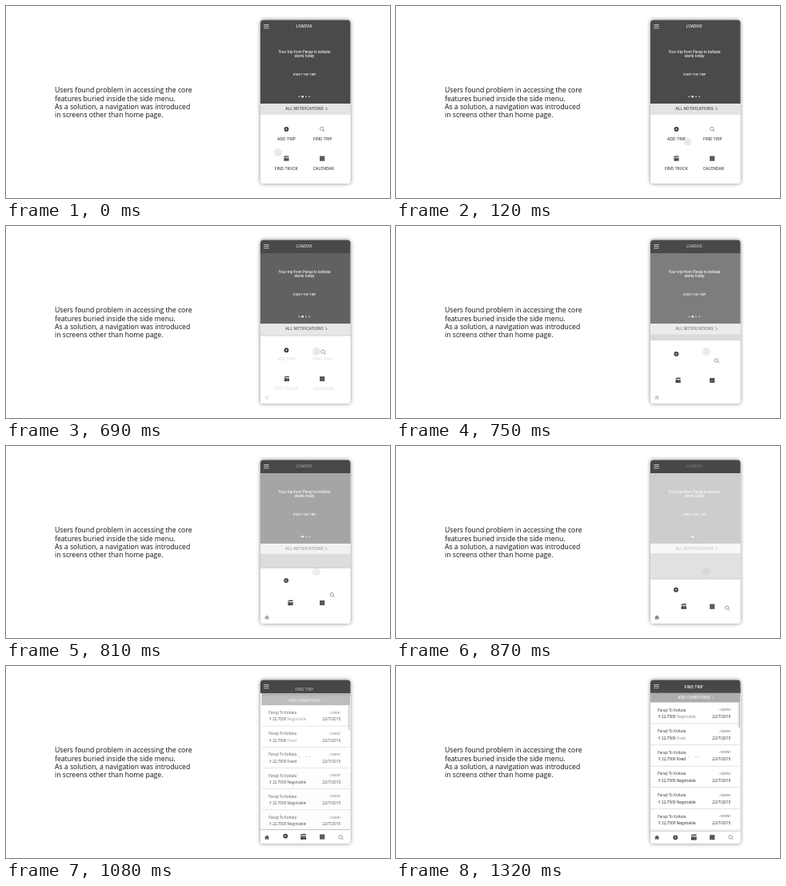
Write an HTML page with a canvas that moves like this. It is 480 by 240 pixels and loops after 2220 ms.

```html
<!DOCTYPE html>
<html lang="en">
<head>
<meta charset="utf-8">
<title>Trip finder navigation</title>
<style>
  html, body { margin: 0; width: 100%; height: 100%; overflow: hidden; background: #fff; }
  canvas { display: block; width: 480px; height: 240px; }
</style>
</head>
<body>
<canvas id="stage"></canvas>
<script>
const LOOP = 2220;
const canvas = document.getElementById('stage');
const ctx = canvas.getContext('2d');
const ratio = window.devicePixelRatio || 1;
canvas.width = 480 * ratio;
canvas.height = 240 * ratio;

const UI = 'Inter, sans-serif';
const BODY = '"Open Sans", sans-serif';
const DARK = '#4a4a4a';
const INK = '#3c3c3c';

const lerp = (a, b, p) => a + (b - a) * p;
const gray = v => `rgb(${v},${v},${v})`;

// Quadratic ease-in-out between two times.
function ease(t, start, end) {
  const p = Math.min(1, Math.max(0, (t - start) / (end - start)));
  return p < 0.5 ? 2 * p * p : 1 - 2 * (1 - p) ** 2;
}

function rect(x, y, w, h, color) {
  ctx.fillStyle = color;
  ctx.fillRect(x, y, w, h);
}

function disc(x, y, r, color) {
  ctx.fillStyle = color;
  ctx.beginPath();
  ctx.arc(x, y, r, 0, Math.PI * 2);
  ctx.fill();
}

function path(points, color, width = 0.8) {
  ctx.strokeStyle = color;
  ctx.lineWidth = width;
  ctx.beginPath();
  points.forEach(([x, y]) => ctx.lineTo(x, y));
  ctx.stroke();
}

// Text centred vertically on its capitals.
function text(str, x, y, size, color, { font = UI, weight = 500, align = 'center' } = {}) {
  ctx.font = `${weight} ${size}px ${font}`;
  ctx.textAlign = align;
  ctx.fillStyle = color;
  ctx.fillText(str, x, y + size * 0.36);
}

function withAlpha(alpha, draw) {
  if (alpha <= 0) return;
  ctx.save();
  ctx.globalAlpha *= alpha;
  draw();
  ctx.restore();
}

function at(x, y, scale, draw) {
  ctx.save();
  ctx.translate(x, y);
  ctx.scale(scale, scale);
  draw();
  ctx.restore();
}

function plusIcon() {
  disc(0, 0, 2.9, INK);
  path([[-1.3, 0], [1.3, 0]], '#ddd', 0.7);
  path([[0, -1.3], [0, 1.3]], '#ddd', 0.7);
}

function searchIcon() {
  ctx.strokeStyle = '#777';
  ctx.lineWidth = 0.7;
  ctx.beginPath();
  ctx.arc(-0.5, -0.5, 2.2, 0, Math.PI * 2);
  ctx.stroke();
  path([[1.1, 1.1], [2.9, 2.9]], '#777');
}

function truckIcon() {
  rect(-3, -1, 6, 4, INK);
  path([[-3, -2], [0, -2.8], [3, -2.6]], INK, 1.2);
  path([[-3, -0.2], [3, -0.2]], '#bbb', 0.5);
  path([[0.7, 0.2], [0.7, 3]], '#bbb', 0.5);
}

function gridIcon() {
  rect(-2.9, -2.9, 5.8, 5.8, '#8a8a8a');
  for (let i = 0; i < 9; i++) rect(-2.9 + (i % 3) * 2.1, -2.9 + Math.floor(i / 3) * 2.1, 1.6, 1.6, '#333');
}

function homeIcon() {
  path([[-2.8, 0.2], [0, -2.3], [2.8, 0.2]], '#333', 0.9);
  ctx.fillStyle = '#333';
  ctx.beginPath();
  [[-1.9, 0.2], [0, -1.5], [1.9, 0.2], [1.9, 2.6], [0.6, 2.6], [0.6, 0.9], [-0.6, 0.9], [-0.6, 2.6], [-1.9, 2.6]]
    .forEach(([x, y]) => ctx.lineTo(x, y));
  ctx.fill();
}

function phonePath() {
  ctx.beginPath();
  ctx.roundRect(318, 17.5, 112.5, 204.5, 4);
}

function caption() {
  [
    'Users found problem in accessing the core',
    'features buried inside the side menu.',
    'As a solution, a navigation was introduced',
    'in screens other than home page.'
  ].forEach((line, i) => text(line, 61, 105.3 + i * 10.35, 8.66, '#111', { font: BODY, weight: 400, align: 'left' }));
}

function homeScreen(fade, move) {
  rect(318, 34, 113, 88, gray(lerp(74, 255, fade)));
  text('Your trip from Panaji to kolkata', 373, 57.3, 4.45, '#fff');
  text('starts today', 373, 62.3, 4.45, '#fff');
  text('START THE TRIP', 373, 86.2, 3.6, '#fff');
  [366.5, 370.7, 375, 379.2].forEach((x, i) => disc(x, 113.3, i === 1 ? 1.3 : 0.9, i === 1 ? '#fff' : '#d0d0d0'));

  rect(318, 122, 113, 90, gray(lerp(218, 255, move * move)));
  rect(318, 122, 113, lerp(14.5, 11, fade), gray(lerp(228, 255, fade)));
  withAlpha(1 - fade, () => {
    text('ALL NOTIFICATIONS', 373, 128.5, 4.85, '#444');
    path([[399.5, 126.6], [401.3, 128.4], [399.5, 130.2]], '#444');
  });
}

function tripList(show, move) {
  const scale = lerp(0.45, 1, move);
  ctx.save();
  ctx.translate(412, 277);
  ctx.scale(scale, scale);
  ctx.translate(-412, -277);
  withAlpha(show ** 4, () => rect(318, 28, 113, 6, DARK));
  withAlpha(show, () => {
    text('FIND TRIP', 372.3, 25.8, 4.85, gray(255 * show));
    rect(318, 33.7, 112.5, 11.8, '#adadad');
    text('ADD CONDITIONS', 372.5, 39.5, 4.6, '#fff');
    path([[395.2, 39], [396.4, 40.2], [397.6, 39]], '#fff', 0.7);
    for (let row = 0; row < 6; row++) {
      const y = 55 + row * 26.6;
      const terms = row === 1 || row === 2 ? 'Fixed' : 'Negotiable';
      const left = { font: BODY, weight: 400, align: 'left' };
      const right = { ...left, align: 'right' };
      text('Panaji To Kolkata', 327, y, 4.5, '#333', left);
      text('CEMENT', 418.3, y, 3.5, '#555', right);
      text('₹ 22,7500 ', 328, y + 8.5, 4.75, '#222', left);
      const termsX = 328 + ctx.measureText('₹ 22,7500 ').width;
      text(terms, termsX, y + 8.5, 4.75, row < 2 ? '#888' : '#222', left);
      text('22/7/2015', 418.3, y + 8.5, 4.85, '#222', right);
      rect(318, y + 16.6, 112.5, 0.7, '#d4d4d4');
    }
    rect(428.4, 46, 1.4, 31, '#b5b5b5');
  });
  ctx.restore();
}

function bottomPanel(t, fade, move) {
  const top = lerp(136, 207, move);
  rect(318, top, 113, 222 - top, '#fff');
  withAlpha(fade, () => rect(318, top - 0.7, 113, 0.8, t < 1320 ? '#b4b4b4' : '#c8c8c8'));

  withAlpha(1 - ease(t, 570, 740), () => {
    text('ADD TRIP', 350.5, 166.2, 4.95, '#444');
    text('FIND TRIP', 395.8, 166.2, 4.95, '#444');
    text('FIND TRUCK', 350.5, 202.8, 4.85, '#444');
    text('CALENDAR', 396.8, 202.8, 4.9, '#444');
  });

  const search = ease(t, 630, 980);
  at(lerp(350.5, 349.3, move), lerp(154, 214.3, move), 1, plusIcon);
  at(lerp(395.3, 418.7, search), lerp(154, 214.3, search), 1, searchIcon);
  at(lerp(350.5, 372.3, move), lerp(190.6, 214.2, move), lerp(1, 1.12, move), truckIcon);
  at(395.3, lerp(190.6, 214.2, move), 1, gridIcon);
  withAlpha(fade, () => at(326.2, 214.3, 1, homeIcon));
}

function header(fade) {
  rect(318, 17, 113, 17, gray(lerp(74, 70, fade)));
  [23.4, 25.6, 27.8].forEach(y => rect(322.3, y - 0.4, 6.4, 0.8, '#ddd'));
  withAlpha(1 - fade, () => text('LOADVIX', 372.8, 25.8, 4.6, '#fff'));
}

function pointer(t, fade) {
  const p = ease(t, 30, 210);
  withAlpha(1 - fade * fade, () => disc(lerp(340, 388, p), lerp(183, 157, p), 5, 'rgba(0,0,0,0.085)'));
}

function draw(t) {
  const fade = ease(t, 570, 1050);
  const move = ease(t, 640, 1140);
  const show = ease(t, 930, 1150);

  ctx.setTransform(ratio, 0, 0, ratio, 0, 0);
  rect(0, 0, 480, 240, '#fff');
  caption();

  ctx.save();
  ctx.shadowColor = 'rgba(40,50,45,0.6)';
  ctx.shadowBlur = 5 * ratio;
  ctx.fillStyle = '#fff';
  phonePath();
  ctx.fill();
  ctx.restore();

  ctx.save();
  phonePath();
  ctx.clip();
  homeScreen(fade, move);
  header(fade);
  tripList(show, move);
  bottomPanel(t, fade, move);
  pointer(t, fade);
  ctx.restore();
}

function tick() {
  draw(performance.now() % LOOP);
  requestAnimationFrame(tick);
}
tick();
</script>
</body>
</html>
```
